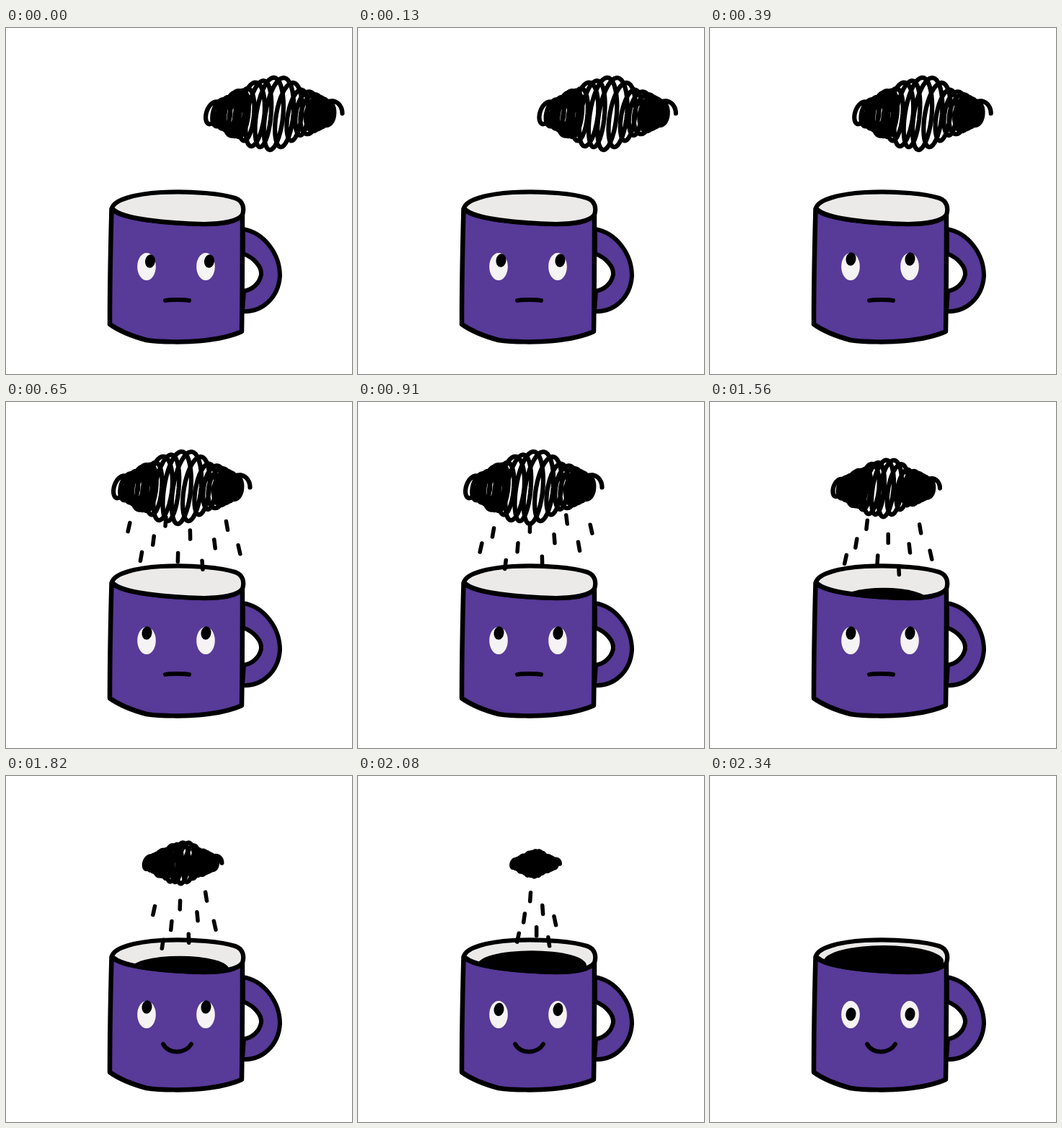
An HTML page with a canvas that plays this animation: 480 by 480 pixels, repeating every 2.6 s.

```html
<!DOCTYPE html>
<html lang="en">
<head>
<meta charset="utf-8">
<title>Mug under a rain cloud</title>
<style>
  html, body { margin: 0; width: 100%; height: 100%; overflow: hidden; background: #fff; }
  canvas { display: block; width: 480px; height: 480px; }
</style>
</head>
<body>
<canvas id="stage" width="480" height="480"></canvas>
<script>
const ctx = document.getElementById('stage').getContext('2d');
const STEP = 130, LOOP = 2600;
// Steps at which something begins or ends
const ARRIVE = 5, SHRINK = 10, DRY = 16, END = 18;
const PURPLE = '#583a98', CREAM = '#ebeae9', EYE = '#f6f3f4';

const rim = new Path2D('M147 250C150 238 180 230 215 228C260 226 300 230 318 236C329 240 331 250 328 259C322 268 300 272 275 272C230 271 160 266 147 250Z');
const body = new Path2D('M146.5 251C145 305 144 360 144 411C158 421 180 429 195 433C215 436 250 436 270 434C290 432 312 428 327 421C328 365 328 310 328 259C322 268 300 272 275 272C230 271 160 266 146.5 251Z');
const handle = new Path2D('M329 279C358 284 380 313 380 344C378 374 355 395 328 393L330 365C342 363 352 354 354 342C355 332 345 319 329 313Z');
const scribble = makeScribble(21);

const mix = (a, b, k) => a + (b - a) * k;
const ramp = (t, from, to) => Math.min(1, Math.max(0, (t - from) / (to - from)));

function seeded(seed) {
  return () => (seed = seed * 16807 % 2147483647) / 2147483647;
}

// One pen line that circles while it moves right, lingering in two dark patches
function makeScribble(loops) {
  const path = new Path2D(), random = seeded(77), detail = 36;
  let wobble = random(), next = random();
  for (let p = 0; p <= loops * detail; p++) {
    const part = p % detail / detail, angle = part * 2 * Math.PI;
    if (p && !part) [wobble, next] = [next, random()];
    const w = wobble + (next - wobble) * part;
    const s = 2 * p / (loops * detail) - 1;
    const u = s - 0.12 * Math.sin(4.83 * (s + 0.55));
    const height = 17 + 34 * Math.cos(u * Math.PI / 2) ** 2;
    const y = height * (0.8 + 0.2 * w) * Math.sin(angle);
    path.lineTo(95 * u + (9 + 7 * w) * Math.cos(angle) - 0.12 * y, y);
  }
  return path;
}

function oval(x, y, rx, ry, color, tilt = 0) {
  ctx.beginPath();
  ctx.ellipse(x, y, rx, ry, tilt, 0, 7);
  ctx.fillStyle = color;
  ctx.fill();
}

function outline(path, width, color) {
  if (color) {
    ctx.fillStyle = color;
    ctx.fill(path);
  }
  ctx.lineWidth = width;
  ctx.stroke(path);
}

function cloudAt(step) {
  const size = 1 - 0.108 * Math.max(0, step - SHRINK);
  return {
    size,
    x: mix(367, 239, ramp(step, 0, ARRIVE)) + 9 * (1 - size),
    y: 118.5 + 5 * (1 - size)
  };
}

function drawCloud({ x, y, size }) {
  ctx.save();
  ctx.translate(x, y);
  ctx.scale(size, size);
  outline(scribble, 6.2 / size);
  ctx.restore();
}

function drawRain(step, { x, size }) {
  const count = Math.round(5 + 5 * size);
  ctx.lineWidth = 5.5;
  for (let i = 0; i < count; i++) {
    const side = (i + 0.5) / count - 0.5;
    const phase = (i * 0.62 + 0.18 + (step - ARRIVE) * 0.24) % 1;
    const dropX = x + size * (8 + 170 * side);
    const dropY = 163 + phase * (80 - 0.3 * Math.abs(dropX - 240));
    const lean = 3 * side;
    ctx.beginPath();
    ctx.moveTo(dropX - lean, dropY - 6);
    ctx.lineTo(dropX + lean, dropY + 6);
    ctx.stroke();
  }
}

function drawCoffee(step) {
  const level = ramp(step, SHRINK, END) ** 0.85;
  if (!level) return;
  const ry = mix(14, 22, level);
  ctx.save();
  ctx.clip(rim);
  oval(241, mix(268, 235, level) + ry, mix(50, 83, level), ry, '#000');
  ctx.restore();
}

function drawFace(step) {
  const lookX = mix(5, 0.5, ramp(step, 0, 3));
  const lookY = -7 - 3 * ramp(step, 0, 3) + 10 * ramp(step, DRY - 1, END);
  for (const x of [195, 277]) {
    oval(x, 331, 12.8, 19, EYE);
    oval(x + lookX, 330.5 + lookY, 7, 9.2, '#000', 0.15);
  }
  const smile = ramp(step, 12, 14);
  const half = mix(16.5, 19.5, smile), ends = mix(378, 372, smile), dip = mix(376.5, 386, smile);
  ctx.lineWidth = 6;
  ctx.beginPath();
  ctx.moveTo(237.5 - half, ends);
  ctx.bezierCurveTo(226, dip, 248, dip, 237.5 + half, ends);
  ctx.stroke();
}

function draw(step) {
  ctx.fillStyle = '#fff';
  ctx.fillRect(0, 0, 480, 480);
  ctx.strokeStyle = '#000';
  ctx.lineCap = ctx.lineJoin = 'round';

  outline(handle, 6, PURPLE);
  outline(body, 6.5, PURPLE);
  ctx.fillStyle = CREAM;
  ctx.fill(rim);
  drawCoffee(step);
  outline(rim, 6.2);
  drawFace(step);

  const cloud = cloudAt(step);
  if (step >= ARRIVE && step <= DRY) drawRain(step, cloud);
  if (step < END) drawCloud(cloud);
}

const start = performance.now();
function tick() {
  const time = (performance.now() - start) % LOOP;
  draw(Math.min(END, Math.floor(time / STEP)));
  requestAnimationFrame(tick);
}
tick();
</script>
</body>
</html>
```
